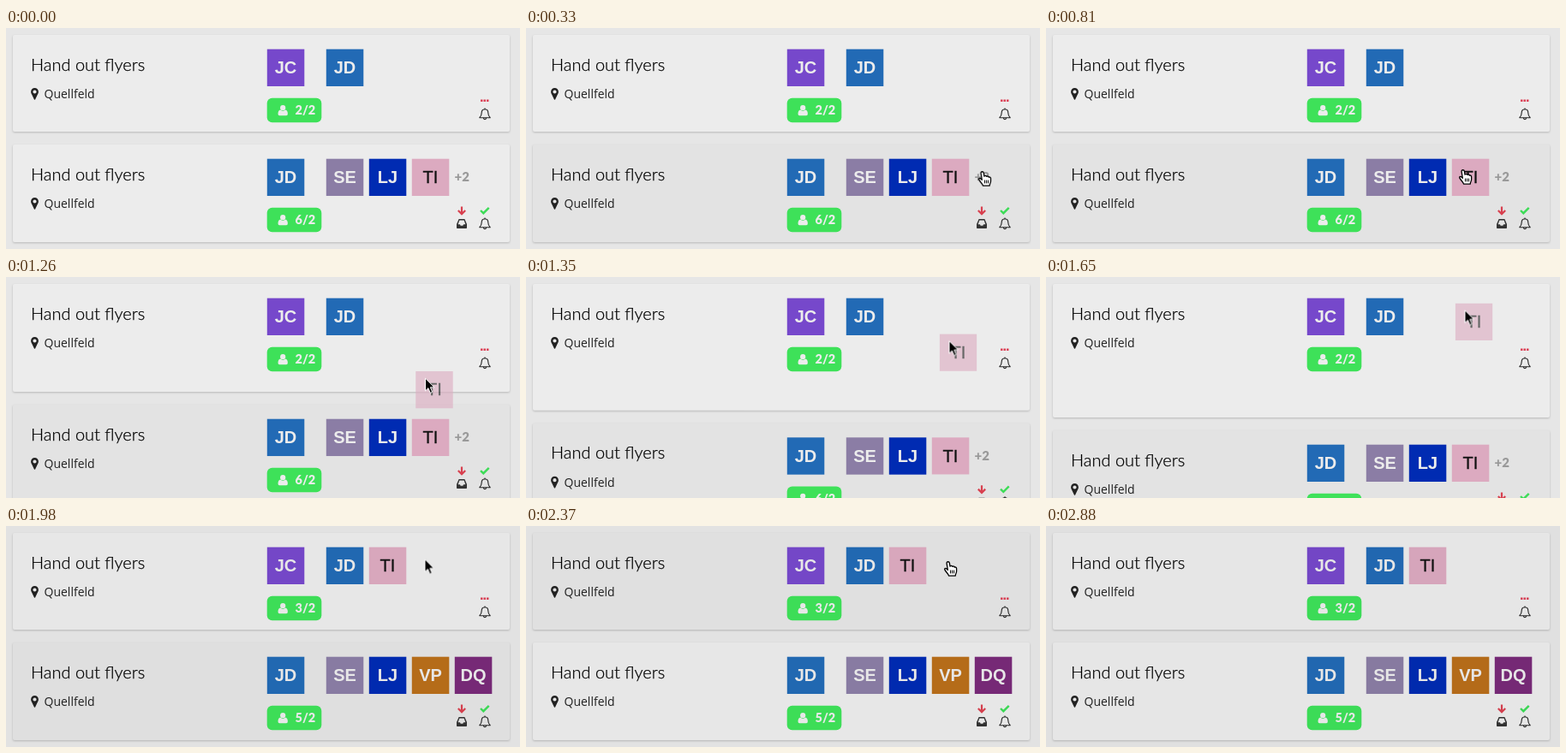
Animation of 600 by 258 pixels, one loop 2.97 s. Source, as an HTML page:

```html
<!DOCTYPE html>
<html lang="en">
<head>
<meta charset="utf-8">
<title>Move a helper between tasks</title>
<style>
html, body { margin: 0; width: 100%; height: 100%; overflow: hidden; background: #e6e6e6; }
svg { display: block; width: 600px; height: 258px; }
text { white-space: pre; font-variant-ligatures: none; }
.title { font: 300 20px Lato, sans-serif; fill: #000; stroke: #000; stroke-width: .25; }
.place { font: 14px "Open Sans", sans-serif; fill: #222; }
.initials { font: bold 20px "Liberation Sans", Arial, sans-serif; text-anchor: middle; fill: #ececec; }
.dark { font-weight: 400; fill: #111; stroke: #111; stroke-width: .3; }
.count { font: 900 14.5px Lato, sans-serif; fill: #ececec; }
.more { font: 900 15px Lato, sans-serif; fill: #999; }
.card { fill: #ececec; filter: drop-shadow(0 1px 1px rgba(0, 0, 0, .2)); }

.card, .lower, .cursor, .hand, .arrow, .ghost, .before, .after, .dim { animation: 2970ms linear infinite; }
#card1 { animation-name: hover1, grow; animation-timing-function: step-end, linear; }
#card2 { animation-name: hover2; animation-timing-function: step-end; }
.lower { animation-name: push; }
.cursor { animation-name: move; }
.hand, .arrow, .ghost, .before, .after, .dim { animation-timing-function: step-end; }
.hand { animation-name: hand; }
.arrow { animation-name: arrow; }
.ghost { animation-name: ghost; }
.before { animation-name: before; }
.after { animation-name: after; }
.dim { animation-name: dim; }

@keyframes hover1 { 0%, 86.869%, 100% { fill: #ececec; } 67.677% { fill: #e4e4e4; } }
@keyframes hover2 { 0%, 67.677%, 100% { fill: #ececec; } 8.081% { fill: #e3e3e3; } }
@keyframes grow {
  0% { height: 113px; }
  40.404% { height: 113px; animation-timing-function: ease; }
  50.505% { height: 156px; animation-timing-function: step-end; }
  63.636%, 100% { height: 113px; }
}
@keyframes push {
  0% { transform: translateY(0); }
  40.404% { transform: translateY(0); animation-timing-function: ease; }
  50.505% { transform: translateY(43px); animation-timing-function: step-end; }
  63.636%, 100% { transform: translateY(0); }
}
@keyframes move {
  0%, 8.081% { transform: translate(585px, 222px); }
  11.111% { transform: translate(533px, 167px); animation-timing-function: ease-out; }
  25.253% { transform: translate(493px, 165px); animation-timing-function: step-end; }
  27.273% { transform: translate(487px, 165px); animation-timing-function: step-end; }
  37.374% { transform: translate(484.5px, 160.5px); animation-timing-function: cubic-bezier(.4, 0, .8, .8); }
  45.455% { transform: translate(493.5px, 74.5px); animation-timing-function: ease-out; }
  55.556%, 78.788% { transform: translate(488.5px, 38.5px); }
  79.798% { transform: translate(493px, 41px); animation-timing-function: ease-in; }
  86.869%, 100% { transform: translate(577px, 92px); }
}
@keyframes hand { 0%, 37.374%, 86.869%, 100% { opacity: 0; } 8.081%, 67.677% { opacity: 1; } }
@keyframes arrow { 0%, 67.677%, 100% { opacity: 0; } 37.374% { opacity: 1; } }
@keyframes ghost { 0%, 63.636%, 100% { opacity: 0; } 37.374% { opacity: .6; } }
@keyframes before { 0% { opacity: 1; } 65.657%, 100% { opacity: 0; } }
@keyframes after { 0% { opacity: 0; } 65.657%, 100% { opacity: 1; } }
@keyframes dim { 0% { opacity: 0; } 63.636% { opacity: .02; } 95.96%, 100% { opacity: .026; } }
</style>
</head>
<body>
<svg viewBox="0 0 600 258">
  <defs>
    <path id="pin" fill="#222" fill-rule="evenodd" d="M4.5 0A4.4 4.4 0 0 0 .1 4.5C.1 6 .7 6.8 1.2 7.8L3.8 13.3Q4.5 14.3 5.2 13.3L7.8 7.8C8.3 6.8 8.9 6 8.9 4.5A4.4 4.4 0 0 0 4.5 0ZM4.5 2.4A2.1 2.1 0 1 1 4.5 6.6A2.1 2.1 0 1 1 4.5 2.4Z"/>
    <g id="person" fill="#ececec">
      <circle cx="5.5" cy="3.2" r="3.1"/>
      <path d="M2.6 5.6Q5.5 8.2 8.4 5.6Q11.2 6.4 11.2 10.2Q11.2 12.2 9.4 12.2H1.6Q-.2 12.2-.2 10.2Q-.2 6.4 2.6 5.6Z"/>
    </g>
    <g id="bell" fill="none" stroke="#222" stroke-width="1.1" stroke-linejoin="round">
      <path d="M7 1.3C4.3 1.5 3.2 3.4 3.2 5.6C3.2 8.6 2.2 10 .8 11.2H13.2C11.8 10 10.8 8.6 10.8 5.6C10.8 3.4 9.7 1.5 7 1.3ZM7 0V1.4"/>
      <path d="M5.4 11.5A1.6 1.6 0 0 0 8.6 11.5"/>
    </g>
    <path id="inbox" fill="#333" fill-rule="evenodd" d="M2.6 0H9.4L12 6V10.2Q12 11 11.2 11H.8Q0 11 0 10.2V6ZM3.4 1.4L1.6 6.2H3.9L4.7 7.8H7.3L8.1 6.2H10.4L8.6 1.4Z"/>
  </defs>
  <rect width="600" height="258" fill="#e6e6e6"/>
  <g id="upper"></g>
  <g id="lower" class="lower"></g>
  <g class="cursor">
    <g id="ghost" class="ghost"></g>
    <path class="arrow" fill="#000" stroke="#fff" d="M.5 .3V15L3.9 11.8L6.2 17.4L8.7 16.4L6.4 10.9H11Z"/>
    <g class="hand" transform="translate(-5 0)" stroke="#000" stroke-width="1.3" stroke-linejoin="round" stroke-linecap="round">
      <path fill="#fff" d="M3.1 2.6C2.9 .3 6 .1 6.4 2.3L7 6.1C7.8 4.9 9.5 5.1 9.8 6.4C10.8 5.5 12.1 6 12.3 7.2C13.5 6.6 14.6 7.4 14.6 8.8V11.5C14.6 13.8 13.4 14.7 13.2 17.2H5.6C5.1 14.9 2.6 13.2 1 10.4C.1 8.8 1.7 7.8 3 9L4.3 10.2Z"/>
      <path fill="none" stroke-width="1" d="M7.5 11V14M9.5 11V14M11.5 11V14"/>
    </g>
  </g>
  <rect class="dim" width="600" height="258"/>
</svg>
<script>
const $ = id => document.getElementById(id);
const use = (id, x, y) => `<use href="#${id}" x="${x}" y="${y}"/>`;
const text = (cls, x, y, s) => `<text class="${cls}" x="${x}" y="${y}">${s}</text>`;
const group = (cls, body) => `<g class="${cls}">${body}</g>`;

const colors = {
  JC: '#7648cb', JD: '#226ab5', SE: '#8b7da5', LJ: '#002bb2',
  TI: '#dcaac0', VP: '#b96e1a', DQ: '#782a78'
};

const tile = (name, x, y) =>
  `<rect x="${x - .2}" y="${y - .3}" width="43.5" height="43.3" fill="${colors[name]}"/>` +
  text(name === 'TI' ? 'initials dark' : 'initials', x + 21.5, y + 28, name);

// Content common to both task cards, y = top edge
const task = (id, y, was, now) =>
  `<rect id="${id}" class="card" x="8" y="${y}" width="580" height="114" rx="2"/>` +
  text('title', 29, y + 41.5, 'Hand out flyers') +
  use('pin', 29, y + 62) +
  text('place', 44.5, y + 74, 'Quellfeld') +
  `<rect x="304.7" y="${y + 73.8}" width="63.6" height="28.4" rx="6" fill="#3ee159"/>` +
  use('person', 317.7, y + 82) +
  group('before', text('count', 337.5, y + 93, was)) +
  group('after', text('count', 337.5, y + 93, now)) +
  use('bell', 552, y + 85.5);

$('upper').innerHTML = task('card1', 8, '2/2', '3/2') +
  tile('JC', 305, 25) + tile('JD', 374, 25) +
  group('after', tile('TI', 424, 25)) +
  '<path d="M554 84.7H563.5" stroke="#dc4358" stroke-width="2.4" stroke-dasharray="2.5 1"/>';

$('lower').innerHTML = task('card2', 136, '6/2', '5/2') +
  tile('JD', 305, 153) + tile('SE', 374, 153) + tile('LJ', 424, 153) +
  group('before', tile('TI', 474, 153) + text('more', 523.5, 179, '+2')) +
  group('after', tile('VP', 474, 153) + tile('DQ', 524, 153)) +
  '<path d="M532 208.5V217M527.8 213L532 217.2L536.2 213" fill="none" stroke="#d8404f" stroke-width="2.2"/>' +
  '<path d="M554 213L557.3 216.2L563.7 209.8" fill="none" stroke="#3ddc57" stroke-width="2.4"/>' +
  use('inbox', 526, 223);

$('ghost').innerHTML = tile('TI', -10.5, -7.5);
</script>
</body>
</html>
```
